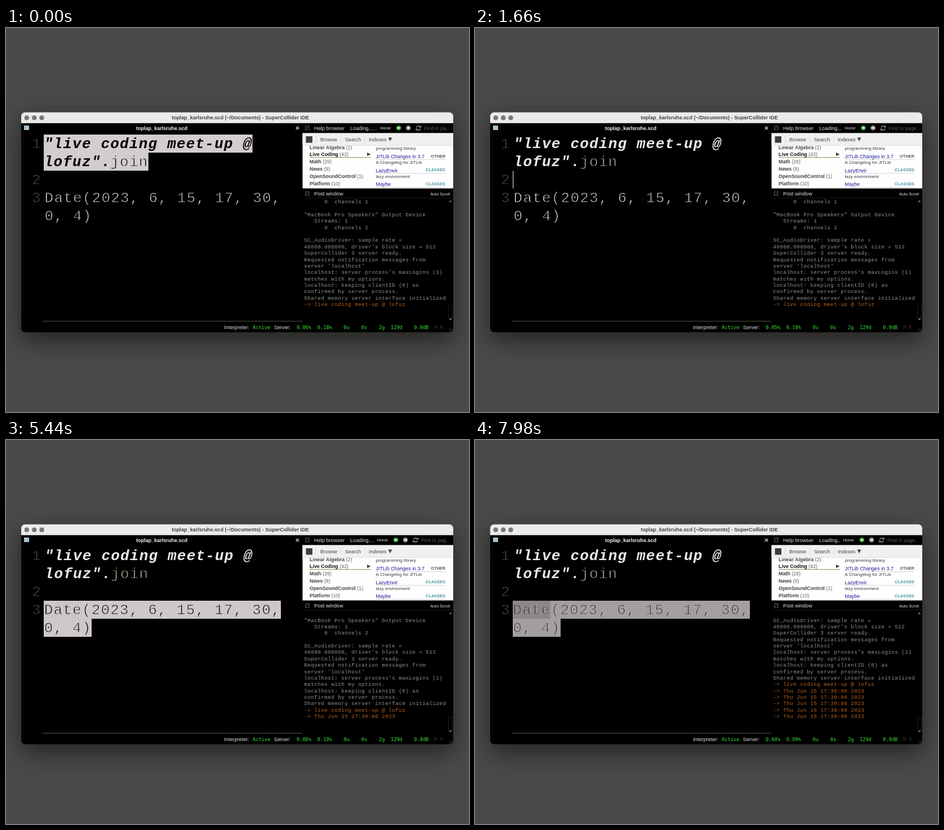
Recreate the animation shown at these times as an HTML page with a canvas. Size 822 by 681 pixels, loop 8 s.

```html
<!DOCTYPE html>
<html lang="en">
<head>
<meta charset="utf-8">
<title>Live coding session</title>
<style>
html, body { margin: 0; width: 100%; height: 100%; overflow: hidden; background: #4a4a49; }
canvas { display: block; width: 822px; height: 681px; }
</style>
</head>
<body>
<canvas id="stage" width="822" height="681"></canvas>
<script>
const canvas = document.getElementById('stage');
const ctx = canvas.getContext('2d');
const inkCanvas = canvas.cloneNode();
const ink = inkCanvas.getContext('2d');

const LOOP = 8000;
const SANS = '"Liberation Sans", Arial, sans-serif';
const COURIER = '"Liberation Mono", "Courier New", monospace';
const MENLO = '"DejaVu Sans Mono", monospace';

const VENUE = 'lofuz';
const CHAR = 16.8, LEFT = 68, ROW_TOP = 189, ROW = 32;
const FADE = 1680;
const DATE_EVALS = [4880, 5480, 5920, 6360, 6810];
const STRING_EVAL = -245;
const BRACKETS_FROM = 3920;

const POST = [
  '      0  channels 1', '',
  '"MacBook Pro Speakers" Output Device', '   Streams: 1', '      0  channels 2', '',
  'SC_AudioDriver: sample rate =', "48000.000000, driver's block size = 512",
  'SuperCollider 3 server ready.', 'Requested notification messages from',
  "server 'localhost'", "localhost: server process's maxLogins (1)",
  'matches with my options.', 'localhost: keeping clientID (0) as',
  'confirmed by server process.', 'Shared memory server interface initialized',
  `-> live coding meet-up @ ${VENUE}`
];

// Code runs: row, column, text, colour, font style
const CODE = [
  [0, 0, '"live coding meet-up @', '#ebeae8', 'italic bold'],
  [1, 0, VENUE + '"', '#ebeae8', 'italic bold'],
  [1, 6, '.', '#e6e5df', 'bold'],
  [1, 7, 'join', '#c6c4b0', ''],
  [3, 0, 'Date(2023, 6, 15, 17, 30,', '#e4e2d8', ''],
  [4, 0, '0, 4)', '#e4e2d8', '']
];

function rect(x, y, w, h, color) {
  ctx.fillStyle = color;
  ctx.fillRect(x, y, w, h);
}

function disc(x, y, r, color) {
  ctx.fillStyle = color;
  ctx.beginPath();
  ctx.arc(x, y, r, 0, Math.PI * 2);
  ctx.fill();
}

function poly(points, color) {
  ctx.fillStyle = color;
  ctx.beginPath();
  points.forEach(([x, y]) => ctx.lineTo(x, y));
  ctx.closePath();
  ctx.fill();
}

// y is the middle of the capitals
function text(str, x, y, size, color, style = '', family = SANS, align = 'left') {
  ctx.font = `${style} ${size}px ${family}`;
  ctx.textAlign = align;
  ctx.fillStyle = color;
  ctx.fillText(str, x, y + size * 0.35);
}

function clipped(x, y, w, h, draw) {
  ctx.save();
  ctx.beginPath();
  ctx.rect(x, y, w, h);
  ctx.clip();
  draw();
  ctx.restore();
}

function windowFrame() {
  rect(0, 0, 822, 681, '#4a4a49');
  ctx.save();
  ctx.shadowColor = 'rgba(0,0,0,0.55)';
  ctx.shadowBlur = 44;
  ctx.shadowOffsetY = 14;
  ctx.fillStyle = '#000';
  ctx.beginPath();
  ctx.roundRect(27, 149.5, 767, 390, 7);
  ctx.fill();
  ctx.restore();
  ctx.fillStyle = '#ecebe9';
  ctx.beginPath();
  ctx.roundRect(27, 149.5, 767, 19.3, [7, 7, 0, 0]);
  ctx.fill();
  for (const x of [36.8, 50.2, 63.5]) disc(x, 159.3, 4.3, '#787779');
  text('toplap_karlsruhe.scd (~/Documents) - SuperCollider IDE', 416, 159, 9.13, '#434244', 'bold', SANS, 'center');
}

// Light Courier look: small glyphs on a wide pitch, regular weight shaved thinner
function inkText(str, x, y, color, style = '') {
  ink.font = `${style} 26px ${COURIER}`;
  ink.letterSpacing = '1.2px';
  ink.fillStyle = color;
  ink.fillText(str, x + 0.6, y);
  if (style) return;
  ink.save();
  ink.globalCompositeOperation = 'destination-out';
  ink.lineWidth = 0.9;
  ink.strokeText(str, x + 0.6, y);
  ink.restore();
}

function codeText(rows, dx, color) {
  ink.clearRect(0, 0, 822, 681);
  for (const [row, col, str, tint, style] of CODE) {
    if (rows.includes(row)) {
      inkText(str, LEFT + col * CHAR + dx, ROW_TOP + row * ROW + 23.5, color || tint, style);
    }
  }
  ctx.drawImage(inkCanvas, 0, 0);
}

function lineNumbers() {
  ink.clearRect(0, 0, 822, 681);
  [0, 2, 3].forEach((row, i) => inkText(i + 1, 45.3, ROW_TOP + row * ROW + 23.5, '#525250'));
  ctx.drawImage(inkCanvas, 0, 0);
}

function rowBand(row, from, to, color) {
  const x = LEFT + from * CHAR - 1;
  rect(x, ROW_TOP + row * ROW, LEFT + to * CHAR - x, ROW, color);
}

function flash(t) {
  const start = DATE_EVALS.filter(e => e <= t).pop() ?? STRING_EVAL;
  const x = (t - start) / FADE;
  if (x >= 1) return;
  const rows = start === STRING_EVAL ? [[0, 22], [1, 11]] : [[3, 25], [4, 5]];
  const alpha = 1 - x ** 3;
  ctx.save();
  ctx.globalAlpha = alpha;
  for (const [row, end] of rows) rowBand(row, 0, end, '#d4cdd1');
  ctx.globalAlpha = alpha ** 0.7;
  codeText(rows.map(r => r[0]), -0.9, '#000');
  ctx.restore();
}

function caret(t) {
  let row = 2, col = 0;
  if (t < 560 || (t >= 1960 && t < 3360) || t >= 5000) return;
  if (t >= BRACKETS_FROM) { row = 4; col = 5; }
  else if (t >= 3800) row = 4;
  else if (t >= 3600) row = 3;
  rect(67 + col * CHAR + (col ? 0.5 : 0), ROW_TOP + row * ROW + 0.5, 1.2, 31, '#d0cfca');
}

function editor(t) {
  rect(32, 173, 9, 8, '#a8c4d2');
  text('toplap_karlsruhe.scd', 276.5, 177.8, 9.07, '#f2f2f0', 'bold', SANS, 'center');
  ctx.strokeStyle = '#e4e4e2';
  ctx.lineWidth = 1.2;
  ctx.beginPath();
  ctx.moveTo(514.8, 174.8); ctx.lineTo(520, 180);
  ctx.moveTo(520, 174.8); ctx.lineTo(514.8, 180);
  ctx.stroke();
  lineNumbers();
  if (t >= BRACKETS_FROM) {
    rowBand(3, 4, 25, '#44433c');
    rowBand(4, 0, 5, '#44433c');
  }
  codeText([0, 1, 3, 4], 0);
  flash(t);
  caret(t);
  rect(65, 519, 461, 2, '#2b2b29');
}

function dockIcon(y) {
  ctx.strokeStyle = '#5c5c58';
  ctx.lineWidth = 1;
  ctx.strokeRect(531.5, y - 3.5, 6.5, 6.5);
  ctx.beginPath();
  ctx.moveTo(533, y + 1.5); ctx.lineTo(537, y - 2.5);
  ctx.stroke();
}

function navArrow(x, dir, color) {
  disc(x, 177.3, 4.3, color);
  poly([[x - 3 * dir, 177.3], [x, 174.6], [x, 176.5], [x + 2.8 * dir, 176.5],
        [x + 2.8 * dir, 178.1], [x, 178.1], [x, 180]], '#f4f4f0');
}

function helpHeader(t) {
  const dots = (Math.floor((t + 280) / 560) + 5) % 6 + 1;
  const dx = 2.56 * (dots - 2);
  dockIcon(177.5);
  text('Help browser', 547, 177.8, 9.2, '#e2e2e0');
  text('Loading' + '.'.repeat(dots), 611, 177.8, 9.2, '#e2e2e0');
  text('Home', 653.7 + dx, 177.8, 7.2, '#e2e2e0');
  navArrow(687 + dx, 1, '#2f9c2c');
  navArrow(704 + dx, -1, '#8a8a88');
  ctx.strokeStyle = '#a4a4a2';
  ctx.lineWidth = 1.4;
  for (const a of [0.3, 3.44]) {
    ctx.beginPath();
    ctx.arc(722 + dx, 177.5, 3.6, a, a + 2.3);
    ctx.stroke();
  }
  poly([[723.5 + dx, 176.5], [727 + dx, 176.5], [726.6 + dx, 173]], '#a4a4a2');
  poly([[720.5 + dx, 178.5], [717 + dx, 178.5], [717.4 + dx, 182]], '#a4a4a2');
  const hint = dots < 4 ? 'page' : dots === 4 ? 'pag' : 'pa';
  text(`Find in ${hint}...`, 732 + dx, 177.8, 8.9, '#5e5e5b');
}

function category(name, count, y, color = '#444347') {
  text(name, 539, y, 8.9, color, 'bold');
  const w = ctx.measureText(name + ' ').width;
  text(`(${count})`, 539 + w, y, 8.9, '#605f63');
}

function entry(name, tag, note, y, tint) {
  text(name, 656.5, y, 8.9, '#1c1a98');
  text(tag, 780, y - 0.7, 7.4, tint, 'bold', SANS, 'right');
  rect(657, y + 5, 123, 0.8, '#c9c8cc');
  text(note, 656.5, y + 10.6, 8, '#39383c');
}

function helpPage() {
  rect(526.5, 186.5, 267.5, 98, '#fefefe');
  clipped(526, 186, 268, 98.5, () => {
    category('Linear Algebra', 2, 211.5);
    category('Live Coding', 42, 224, '#151517');
    rect(539, 229, 109, 1, '#8b9150');
    poly([[641, 221], [641, 227], [647.5, 224]], '#39383a');
    category('Math', 29, 237.3);
    category('News', 9, 250.2);
    category('OpenSoundControl', 1, 263);
    category('Platform', 10, 276);
    text('programming library', 656.5, 213, 8, '#39383c');
    entry('JITLib Changes in 3.7', 'OTHER', 'A Changelog for JITLib', 228, '#5a595c');
    entry('LazyEnvir', 'CLASSES', 'lazy environment', 252.5, '#4797ab');
    entry('Maybe', 'CLASSES', '', 277.2, '#4797ab');
    rect(526.5, 186.5, 267.5, 22, '#f1f0f1');
    rect(526.5, 208, 267.5, 0.8, '#dcdbdd');
  });
  rect(532.5, 192, 11.5, 11.5, '#3e3d40');
  text('Browse', 558, 197.5, 9, '#454448');
  text('Search', 601.8, 197.5, 9, '#454448');
  text('Indexes', 644, 197.5, 9, '#454448');
  poly([[678.5, 194.3], [685.5, 194.3], [682, 201]], '#454448');
  for (const x of [550, 594.5, 636.5]) rect(x, 191, 0.8, 13, '#d4d3d5');
}

function postWindow(t) {
  dockIcon(294);
  text('Post window', 547, 294.2, 9.2, '#e2e2e0');
  text('Auto Scroll', 788.3, 294.2, 7.25, '#e2e2e0', '', SANS, 'right');
  rect(526.5, 301, 267.5, 0.8, '#1b1b19');
  const results = DATE_EVALS.filter(e => e <= t).map(() => '-> Thu Jun 15 17:30:00 2023');
  const lines = POST.concat(results);
  clipped(526, 302.5, 258, 216, () => {
    ctx.letterSpacing = '0.42px';
    lines.forEach((line, i) => {
      const y = 489.7 - (lines.length - 1 - i) * 11.35;
      text(line, 529.2, y, 9.3, line.startsWith('->') ? '#b9621c' : '#92918b', '', COURIER);
    });
  });
  ctx.strokeStyle = '#1f1e18';
  ctx.lineWidth = 1;
  ctx.strokeRect(785.5, 491.5, 7, 24);
  poly([[786.5, 308.5], [791.5, 308.5], [789, 305.5]], '#85847e');
  poly([[786.5, 515.5], [791.5, 515.5], [789, 518.5]], '#85847e');
}

function statusBar(t) {
  const y = 531, green = '#36e636';
  const cpu = t >= 7560 ? '0.04%' : t >= 5600 ? '0.05%' : t >= 2660 ? '0.06%' : t >= 700 ? '0.05%' : '0.06%';
  const peak = t >= 5600 ? '0.09%' : '0.18%';
  text('Interpreter:', 387, y, 9.2, '#e2e2e0');
  text('Server:', 475.8, y, 9.2, '#e2e2e0');
  const items = [['Active', 438], [cpu, 516], [peak, 552.8], ['0u', 599.5], ['0s', 630.8],
                 ['2g', 662], ['129d', 683], ['0.0dB', 724.3]];
  for (const [str, x] of items) text(str, x, y, 8.65, green, '', MENLO);
  text('M R', 760, y, 8.65, '#2e2e2c', '', MENLO);
  ctx.strokeStyle = '#55554f';
  ctx.lineWidth = 0.8;
  for (const d of [3, 6]) {
    ctx.beginPath();
    ctx.moveTo(792 - d, 537.5); ctx.lineTo(792, 537.5 - d);
    ctx.stroke();
  }
}

function draw(t) {
  windowFrame();
  editor(t);
  helpHeader(t);
  helpPage();
  postWindow(t);
  statusBar(t);
}

const begin = performance.now();
function tick() {
  draw((performance.now() - begin) % LOOP);
  requestAnimationFrame(tick);
}
tick();
</script>
</body>
</html>
```
